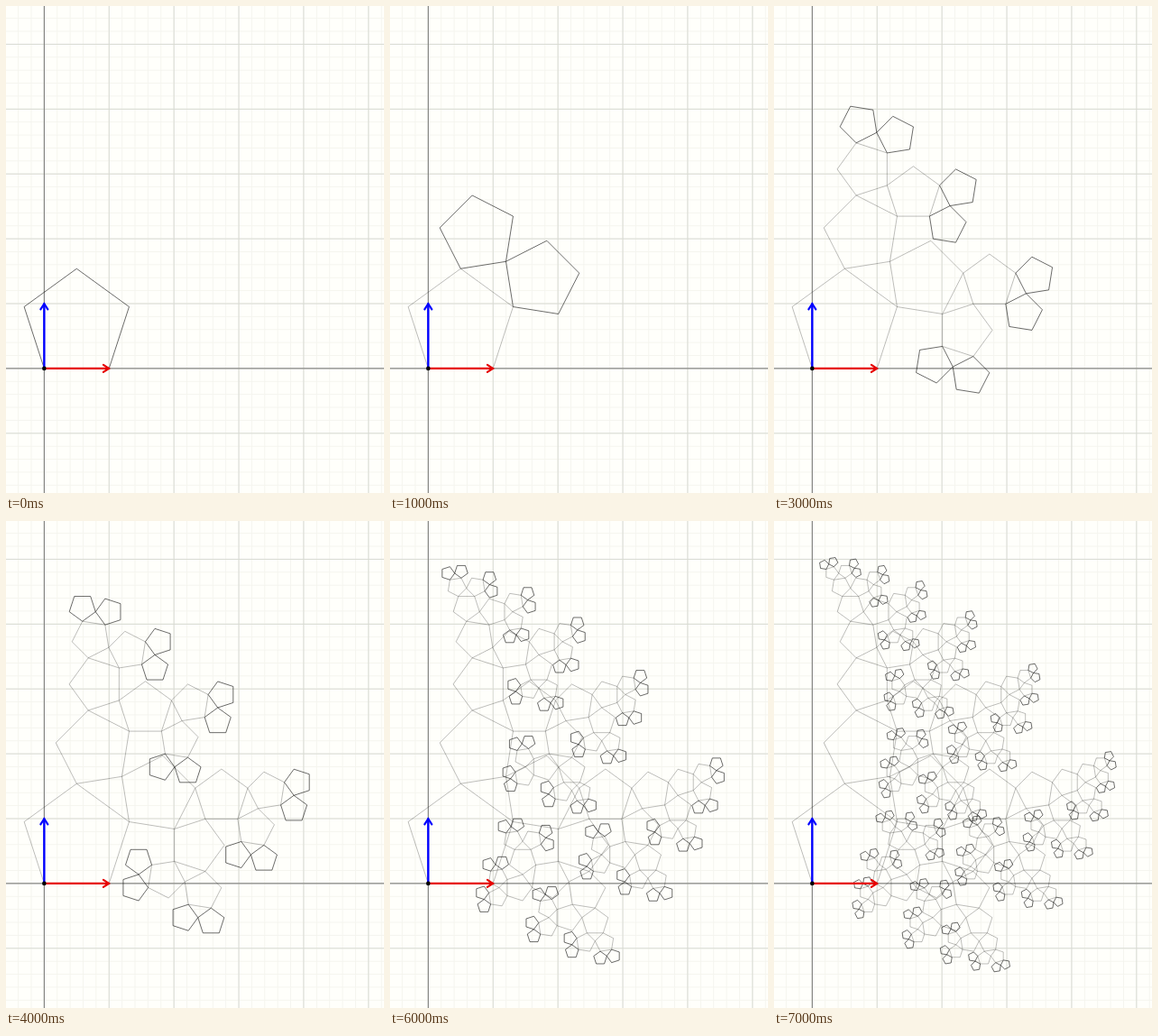
These frames come from a looping animation (419x540 px, 8 s). An HTML page with a canvas:

```html
<!DOCTYPE html>
<html lang="en">
<head>
<meta charset="utf-8">
<title>Pentagon tree</title>
<style>
html, body { margin: 0; width: 100%; height: 100%; overflow: hidden; background: #fffffb; }
canvas { display: block; width: 419px; height: 540px; }
</style>
</head>
<body>
<canvas id="stage" width="419" height="540"></canvas>
<script>
const W = 419, H = 540, STEP = 1000, LEVELS = 8;
const UNIT = 71.9, ORIGIN = [42.35, 401.9];
const ctx = document.getElementById('stage').getContext('2d');

function stroke(points, color, width, closed) {
  ctx.beginPath();
  points.forEach(([x, y]) => ctx.lineTo(x, y));
  if (closed) ctx.closePath();
  ctx.strokeStyle = color;
  ctx.lineWidth = width;
  ctx.stroke();
}

// Regular pentagon standing on the edge a-b, turning left on screen.
function pentagon(a, b) {
  const points = [a, b];
  const heading = Math.atan2(b[1] - a[1], b[0] - a[0]);
  const side = Math.hypot(b[0] - a[0], b[1] - a[1]);
  for (let i = 1; i < 4; i++) {
    const [x, y] = points[i];
    const angle = heading - i * Math.PI * 2 / 5;
    points.push([x + side * Math.cos(angle), y + side * Math.sin(angle)]);
  }
  return points;
}

// A right isosceles triangle on the upper right edge carries two children.
function children([, , c, d]) {
  const dx = c[0] - d[0], dy = c[1] - d[1];
  const apex = [d[0] + (dx + dy) / 2, d[1] + (dy - dx) / 2];
  return [pentagon(d, apex), pentagon(apex, c)];
}

const tree = [[pentagon(ORIGIN, [ORIGIN[0] + UNIT, ORIGIN[1]])]];
while (tree.length < LEVELS) tree.push(tree[tree.length - 1].flatMap(children));

const vertical = (x, color) => stroke([[x, 0], [x, H]], color, 1);
const horizontal = (y, color) => stroke([[0, y], [W, y]], color, 1);

function gridLines(gap, color) {
  for (let x = ORIGIN[0] % gap; x < W; x += gap) vertical(x, color);
  for (let y = ORIGIN[1] % gap; y < H; y += gap) horizontal(y, color);
}

function arrow(angle, color) {
  ctx.save();
  ctx.translate(...ORIGIN);
  ctx.rotate(angle);
  ctx.lineCap = 'round';
  stroke([[0, 0], [UNIT - 0.5, 0]], color, 2.4);
  stroke([[UNIT - 6.3, -4], [UNIT - 0.2, 0], [UNIT - 6.3, 4]], color, 2.2);
  ctx.restore();
}

function draw(level) {
  ctx.fillStyle = '#fffffb';
  ctx.fillRect(0, 0, W, H);
  gridLines(UNIT / 5, '#f5f5ef');
  gridLines(UNIT, '#d8dad3');
  vertical(ORIGIN[0], '#777775');
  horizontal(ORIGIN[1], '#777775');

  for (let i = 0; i <= level; i++) {
    const color = i < level ? 'rgba(0,0,0,.45)' : '#000';
    tree[i].forEach(p => stroke(p, color, 0.58, true));
  }

  arrow(0, '#e60000');
  arrow(-Math.PI / 2, '#0000ff');
  ctx.fillStyle = '#000';
  ctx.beginPath();
  ctx.arc(...ORIGIN, 2.3, 0, Math.PI * 2);
  ctx.fill();
}

const start = performance.now();
let shown = 0;
function tick() {
  const level = Math.floor((performance.now() - start) / STEP) % LEVELS;
  if (level !== shown) draw(shown = level);
  requestAnimationFrame(tick);
}
draw(0);
requestAnimationFrame(tick);
</script>
</body>
</html>
```
